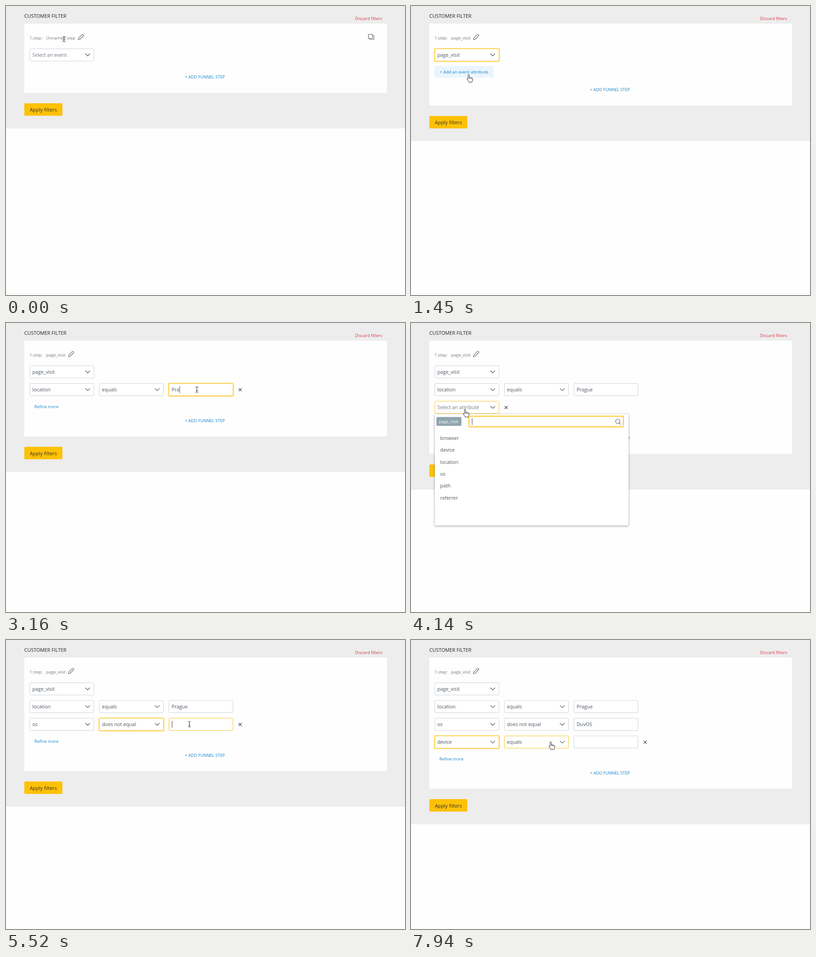
Recreate the animation shown at these times as an HTML page. Size 878 by 638 pixels, loop 7990 ms.

```html
<!DOCTYPE html>
<html lang="en">
<head>
<meta charset="utf-8">
<title>Customer filter</title>
<style>
html, body { margin: 0; width: 100%; height: 100%; overflow: hidden; background: #fefefe; }
svg { display: block; width: 878px; height: 638px; font-family: "Open Sans", "Noto Sans", sans-serif; }
.panel { filter: drop-shadow(0 1px 2px rgba(0, 0, 0, .42)); }
</style>
</head>
<body>
<svg id="stage" viewBox="0 0 878 638"></svg>
<script>
(() => {
const LOOP = 7990;
const stage = document.getElementById('stage');
const pen = document.createElement('canvas').getContext('2d');

const INK = '#4b5560', SOFT = '#6f7880', BLUE = '#1583cd', GOLD = '#ffc107', EDGE = '#cdd2d8';
const TEXT = 10.8, SMALL = 9.35;
const COL = [52.5, 205.5, 358.5], FIELD_W = 141, FIELD_H = 27.5, ITEM_H = 26.3;
const EVENTS = ['cart_update', 'page_visit', 'purchase', 'session_end'];
const ATTRS = ['browser', 'device', 'location', 'os', 'path', 'referrer'];
const OPERATORS = ['equals', 'does not equal', 'contains', 'does not contain', 'has value'];

const EVENT = { open: 380, pick: 700 };
const ROWS = [
  { add: 1490, open: 1550, pick: 2200, attr: 'location', focus: 2680, blur: 3880,
    value: 'Prague', keys: [2990, 3060, 3130, 3190, 3260, 3320], off: [2840, 2990] },
  { add: 3880, open: 4050, pick: 4680, attr: 'os', opOpen: 5010, opPick: 5330, focus: 5500, blur: 6930,
    value: 'DuvOS', keys: [5750, 5910, 6240, 6410, 6580], off: [6080, 6240] },
  { add: 6930, open: 7400, pick: 7620, attr: 'device' }
];

// pointer stops: time, x, y
const PATH = [
  [0, 127.5, 73], [40, 127.5, 73], [300, 130, 106], [420, 130, 106], [620, 96, 206], [700, 96, 206],
  [820, 118, 140], [870, 118, 140], [1010, 127, 148], [1200, 127, 148], [1300, 127, 151.5],
  [1760, 127, 151.5], [2000, 112.5, 251], [2060, 112, 260.5], [2150, 100, 270], [2210, 100, 270],
  [2600, 420, 147], [3540, 420, 147], [3830, 89, 184], [3900, 89, 184], [4030, 119, 191],
  [4420, 119, 191], [4610, 76, 338], [4690, 76, 338], [4950, 290, 187], [5060, 290, 187],
  [5250, 262, 251], [5335, 262, 251], [5480, 403.5, 186], [6590, 403.5, 186], [6870, 89, 227],
  [6960, 89, 227], [7090, 96, 258], [7210, 109, 241], [7330, 115, 227], [7410, 115, 227],
  [7560, 85, 327], [7630, 85, 327], [7900, 307.5, 225], [LOOP, 307.5, 225]
];

const within = (t, a, b) => t >= a && t < b;
const rowTop = i => 94 + 39.1 * i;
const width = (s, size) => {
  pen.font = size + 'px "Open Sans", "Noto Sans", sans-serif';
  return pen.measureText(s).width;
};
const rect = (x, y, w, h, fill, more = '') =>
  `<rect x="${x}" y="${y}" width="${w}" height="${h}" fill="${fill}" ${more}/>`;
const text = (s, x, y, fill = INK, size = TEXT) =>
  `<text x="${x}" y="${y}" font-size="${size}" fill="${fill}">${s}</text>`;
const line = (d, color, w = 1, fill = 'none') =>
  `<path d="${d}" fill="${fill}" stroke="${color}" stroke-width="${w}" stroke-linejoin="round"/>`;
const caret = (x, y) => rect(x, y, 1, 15, '#444');

function pointer(t) {
  let i = 1;
  while (i < PATH.length - 1 && PATH[i][0] <= t) i++;
  const [t0, x0, y0] = PATH[i - 1], [t1, x1, y1] = PATH[i];
  const u = Math.min(1, (t - t0) / (t1 - t0)), k = u * u * (3 - 2 * u);
  return { x: x0 + (x1 - x0) * k, y: y0 + (y1 - y0) * k };
}

const over = (p, x, y, w, h) => p.x >= x && p.x <= x + w && p.y >= y && p.y <= y + h;

// state: 0 plain, 1 hovered, 2 focused
function box(x, y, state) {
  const glow = state > 1
    ? rect(x - 1, y, FIELD_W + 2, FIELD_H + 1, 'none', 'rx="2.5" stroke="#ffe08a" stroke-width="2.6"') : '';
  return glow + rect(x, y + .5, FIELD_W, FIELD_H - .5, '#fff', `rx="2" stroke="${state ? '#fac62a' : EDGE}"`);
}

function select(x, y, label, state, empty) {
  return box(x, y, state) + text(label, x + 5.5, y + 18, empty ? SOFT : INK) +
    line(`M${x + 122.3} ${y + 11.3}l5 5 5-5`, '#56616b', 1.3);
}

function items(list, x, y, w, p) {
  return list.map((s, i) => {
    const iy = y + i * ITEM_H;
    const hot = over(p, x, iy + 8, w, ITEM_H - .1);
    return (hot ? rect(x, iy, w, ITEM_H, '#e9eaed') : '') + text(s, x + 12, iy + 17.6);
  }).join('');
}

function listPanel(y, list, tag, age, p) {
  const sx = 128, sy = y + 34;
  return rect(52.3, y + 29, 426.5, 246, '#fff', 'rx="1.5" class="panel"') +
    (tag ? rect(56, y + 35.2, 55, 19.5, '#90a4ae', 'rx="2"') + text(tag, 61.5, y + 48.6, '#fff', SMALL) : '') +
    rect(sx - .5, sy - .5, 340, 23.5, '#fff', 'rx="2" stroke="#ffe08a" stroke-width="3"') +
    rect(sx, sy, 339, 22.5, '#fff', `rx="1.5" stroke="${GOLD}" stroke-width="1.2"`) +
    line(`M458.4 ${y + 48.4}l3.4 3.4M459.7 ${y + 44.8}a4.7 4.7 0 1 1-9.4 0a4.7 4.7 0 1 1 9.4 0z`, '#56616b', 1.1) +
    (age % 1000 < 500 ? caret(134, y + 38) : '') +
    items(list, 52.3, y + 68.3, 426.5, p);
}

function operatorPanel(y, p) {
  return rect(205.3, y + 29, 313, 150, '#fff', 'rx="1.5" class="panel"') + items(OPERATORS, 205.3, y + 38, 313, p);
}

function cursor(p, kind) {
  const shape = {
    beam: line('M-3-6q3 0 3 1.5v9q0 1.5-3 1.5M3-6q-3 0-3 1.5M3 6q-3 0-3-1.5M-1.5 2h3', '#222', 1),
    hand: line('M-1.5 8.5V1.2a1.4 1.4 0 0 1 2.8 0V6q2.4-.6 2.6.8 2.2-.5 2.5.8 2.2-.2 2.3 1.2V11.5q0 2-1.3 3.5v1.7H0v-1.5Q-2.5 12.5-4 10q.3-2.2 2.5-.6zM1.3 6v3M3.9 7v2.3M6.4 7.8v1.8', '#222', .95, '#fff'),
    arrow: line('M0 0v12l2.8-2.5 1.9 4.2 2-.9-1.9-4.1h3.6z', '#222', .95, '#fff')
  }[kind];
  return `<g transform="translate(${p.x} ${p.y})">${shape}</g>`;
}

function row(r, i, t, p, busy) {
  const y = rowTop(i + 1), picked = t >= r.pick, opened = within(t, r.open, r.pick);
  const opOpened = within(t, r.opOpen, r.opPick);
  const hover = x => !busy && over(p, x, y, FIELD_W, FIELD_H);
  const state = (x, focused) => focused ? 2 : hover(x) ? 1 : 0;
  let s = select(COL[0], y, picked ? r.attr : 'Select an attribute',
    opened ? 1 : state(COL[0], within(t, r.pick, r.opOpen || r.focus || LOOP)), !picked);
  if (picked) {
    s += select(COL[1], y, OPERATORS[t >= r.opPick ? 1 : 0],
      opOpened ? 1 : state(COL[1], within(t, r.opPick, r.focus + 40)));
    s += box(COL[2], y, state(COL[2], within(t, r.focus + 40, r.blur)));
    if (r.value) {
      const typed = r.value.slice(0, r.keys.filter(k => k <= t).length);
      s += text(typed, 364.5, y + 18);
      if (within(t, r.focus, r.blur - 200) && !within(t, ...r.off)) s += caret(365 + width(typed, TEXT), y + 6.5);
    }
  }
  if (opened || opOpened || (!busy && p.y >= y && p.y <= y + FIELD_H)) {
    s += line(`M${picked ? 512 : 206} ${y + 11}l6.6 6.6m0-6.6l-6.6 6.6`, '#2d3338', 1.2);
  }
  return s;
}

function draw(t) {
  const p = pointer(t);
  const chosen = t >= EVENT.pick, eventOpen = within(t, EVENT.open, EVENT.pick);
  const rows = ROWS.filter(r => t >= r.add), n = rows.length, last = rows[n - 1];
  const listRow = rows.findIndex(r => within(t, r.open, r.pick));
  const opRow = rows.findIndex(r => within(t, r.opOpen, r.opPick));
  const busy = eventOpen || listRow >= 0 || opRow >= 0;
  const shift = n ? 58.5 + 39 * (n - 1) : chosen ? 28 : 0;
  const name = chosen ? 'page_visit' : 'Unnamed step';
  const px = 93.7 + width(name, SMALL);

  let s = rect(0, 0, 878, 638, '#fefefe') + rect(0, 0, 878, 270.3 + shift, '#ededed') +
    rect(40.3, 39, 798, 152.7 + shift, '#fefefe') +
    text('CUSTOMER FILTER', 40.3, 26.2, '#222') + text('Discard filters', 768, 30.5, '#d63a4a', SMALL) +
    text('1.step:', 52, 74, SOFT, 9.1) + text(name, 88.3, 74, SOFT, SMALL) +
    `<g transform="translate(${px} 62)">` +
    line('M1 12.5l.9-3.8 8-8q.8-.7 1.6 0l1.2 1.2q.7.8 0 1.6l-8 8z', '#5d666e', 1.1) + '</g>';
  if (!chosen) {
    s += line('M800.5 71.5v2.5h9v-9h-2.5M797.5 62.5h9v9h-9z', '#5d666e', 1.1);
  }

  const link = n
    ? { label: 'Refine more', x: 51, y: rowTop(n + 1) - 1.5, w: 76.5, h: 27, size: 9.3 }
    : { label: '+ Add an event attribute', x: 51.5, y: 132.5, w: 130.5, h: 25.8, size: 9.5 };
  const linkHot = chosen && !busy && over(p, link.x, link.y, link.w, link.h);
  if (chosen) {
    const ring = n && t < last.open;
    if (linkHot || ring) {
      s += rect(link.x, link.y, link.w, link.h, ring ? '#f3f8fc' : '#eaf5fd',
        'rx="2"' + (ring ? ' stroke="#85cffb" stroke-width="2"' : ''));
    }
    s += text(link.label, link.x + 11.5, link.y + link.h / 2 + 3.6, BLUE, link.size);
  }
  s += text('+ ADD FUNNEL STEP', 393.5, 160.4 + shift, BLUE, 9.25) +
    rect(40.3, 214.7 + shift, 83.8, 27.5, GOLD, 'rx="2"') + text('Apply filters', 52.5, 233 + shift, '#33302a');

  const eventHot = over(p, COL[0], rowTop(0), FIELD_W, FIELD_H) && (!busy || eventOpen);
  s += select(COL[0], rowTop(0), chosen ? 'page_visit' : 'Select an event',
    chosen && !n ? 2 : eventOpen || eventHot ? 1 : 0, !chosen);
  s += rows.map((r, i) => row(r, i, t, p, busy)).join('');

  if (eventOpen) s += listPanel(rowTop(0), EVENTS, '', t - EVENT.open, p);
  if (listRow >= 0) s += listPanel(rowTop(listRow + 1), ATTRS, 'page_visit', t - rows[listRow].open, p);
  if (opRow >= 0) s += operatorPanel(rowTop(opRow + 1), p);

  const onField = c => rows.some((r, i) =>
    (c === 0 || t >= r.pick) && over(p, COL[c], rowTop(i + 1), FIELD_W, FIELD_H));
  const kind = p.y < 82 || (!busy && onField(2)) ? 'beam'
    : busy || eventHot || linkHot || onField(0) || onField(1) ? 'hand' : 'arrow';
  stage.innerHTML = s + cursor(p, kind);
}

const start = performance.now();
function tick() {
  draw((performance.now() - start) % LOOP);
  requestAnimationFrame(tick);
}
tick();
})();
</script>
</body>
</html>
```
